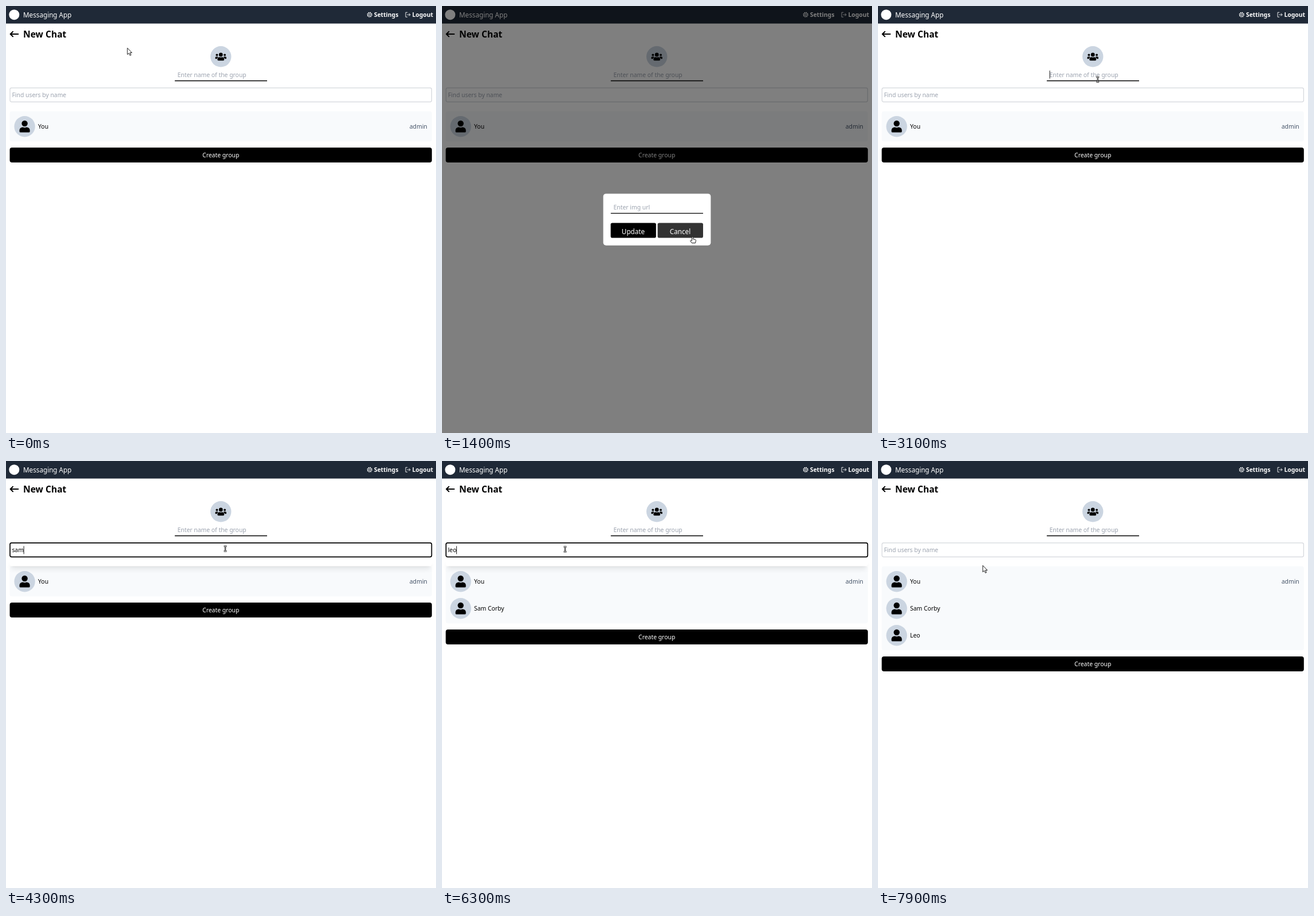
An HTML page for the animation above (8000 ms loop, 751 by 745 pixels).

```html
<!DOCTYPE html>
<html lang="en">
<head>
<meta charset="utf-8">
<title>New group chat</title>
<style>
  html, body { margin: 0; width: 100%; height: 100%; overflow: hidden; background: #fff; }
  svg { display: block; width: 751px; height: 745px; font-family: "Noto Sans", sans-serif; }
  text { white-space: pre; }
</style>
</head>
<body>
<svg id="stage" viewBox="0 0 751 745" xmlns="http://www.w3.org/2000/svg"></svg>
<script>
const LOOP = 8000, STEP = 100, ROW = 47;
const BODY = 10.4, LARGE = 11.7, TITLE = 15.6;
const MUTED = '#9ca3af', SLATE = '#475569', DISC = '#cbd5e1';
const stage = document.getElementById('stage');

// Text placed by the middle of its line box.
const label = (x, middle, text, { size = BODY, fill = '#000', weight = 400, anchor = 'start', id = '' } = {}) =>
  `<text ${id && `id="${id}"`} x="${x}" y="${middle + size * 0.388}" font-size="${size}" fill="${fill}"
    font-weight="${weight}" text-anchor="${anchor}">${text}</text>`;

const box = (x, y, w, h, r, fill, extra = '') =>
  `<rect x="${x}" y="${y}" width="${w}" height="${h}" rx="${r}" fill="${fill}" ${extra}/>`;

const avatar = (x, y) => `<g transform="translate(${x} ${y})">
  <circle r="18.2" fill="${DISC}"/><use href="#person" transform="scale(.0406) translate(-224 -256)"/></g>`;

const member = (name, i) => `<g id="row${i}">${avatar(32.6, 210.2 + ROW * i)}
  ${label(56, 210.2 + ROW * i, name)}</g>`;

const caret = (id, y) => `<path id="${id}" d="M0 ${y}v14" stroke="#000" stroke-width=".9"/>`;

const people = ['You', 'Sam Corby', 'Leo'];

stage.innerHTML = `
<defs>
  <g id="person">
    <circle cx="224" cy="128" r="128"/>
    <path d="M314 288h-17q-73 32-146 0h-17A134 134 0 0 0 0 422v42a48 48 0 0 0 48 48h352a48 48 0 0 0 48-48v-42A134 134 0 0 0 314 288z"/>
  </g>
  <g id="side">
    <circle cx="96" cy="160" r="64"/>
    <path d="M173 275A64 64 0 0 0 128 256H64A64 64 0 0 0 0 320v32a32 32 0 0 0 32 32h66q10-72 75-109z"/>
  </g>
  <filter id="soft" x="-5%" y="-100%" width="110%" height="300%"><feGaussianBlur stdDeviation="4.9"/></filter>
  <filter id="tight" x="-5%" y="-100%" width="110%" height="300%"><feGaussianBlur stdDeviation="1.9"/></filter>
</defs>

<rect width="751" height="745" fill="#fff"/>
<rect width="751" height="30.6" fill="#1f2937"/>
<circle cx="14.3" cy="15.2" r="9" fill="#fff"/>
${label(30, 15.2, 'Messaging App', { size: LARGE, fill: '#fff' })}
<g fill="none" stroke="#fff" transform="translate(635.1 15.2)">
  <circle r="4" stroke-width="1.3" stroke-dasharray="1.7 1.44"/>
  <circle r="3.2" stroke-width=".8"/><circle r="1.4" stroke-width=".8"/>
</g>
${label(642.7, 15.2, 'Settings', { fill: '#fff', weight: 700 })}
<path d="M701.2 11.2H698v8h3.2M700.4 15.2h5.6m-2.3-2.4 2.4 2.4-2.4 2.4" fill="none" stroke="#fff" stroke-width=".9"/>
${label(709.4, 15.2, 'Logout', { fill: '#fff', weight: 700 })}

<path d="M21.3 49H7.6m4.4-4.3L7.6 49l4.4 4.3" fill="none" stroke="#000" stroke-width="2" stroke-linecap="round" stroke-linejoin="round"/>
${label(30, 49.2, 'New Chat', { size: TITLE, weight: 700 })}

<circle cx="375.2" cy="88.3" r="18.2" fill="${DISC}"/>
<g transform="translate(375.2 88.3) scale(.0305) translate(-320 -256)">
  <use href="#side"/><use href="#side" transform="translate(640) scale(-1 1)"/>
  <circle cx="320" cy="144" r="112"/>
  <path d="M397 288h-9q-68 32-136 0h-9A115 115 0 0 0 128 403v29a48 48 0 0 0 48 48h288a48 48 0 0 0 48-48v-29A115 115 0 0 0 397 288z"/>
</g>
${label(299.5, 120, 'Enter name of the group', { fill: MUTED })}
${caret('groupCaret', 112.7)}
<path d="M294.8 130.5H456" stroke="#000" stroke-width="1.3"/>

${box(7, 142.8, 736.4, 24.6, 2.8, '#fff', 'id="search" stroke="#d4d7dc"')}
${label(10.4, 155.1, 'Find users by name', { fill: MUTED, id: 'hint' })}
${label(10.4, 155.1, '', { id: 'query' })}
${caret('searchCaret', 148.4)}

${box(6.5, 183.7, 737.3, 52.6, 4, '#f8fafc', 'id="list"')}
${people.map(member).join('')}
${label(735.8, 210.2, 'admin', { fill: SLATE, anchor: 'end' })}
<g id="create">
  ${box(6.5, 247, 737.3, 26, 4, '#000')}
  ${label(375.2, 260, 'Create group', { fill: '#fff', anchor: 'middle' })}
</g>

<g id="drop">
  ${box(8.5, 181.6, 733.3, 6.5, 3, '#000', 'id="shadowSoft" opacity=".1" filter="url(#soft)"')}
  ${box(9.1, 178.4, 732.1, 5.2, 3, '#000', 'id="shadowTight" opacity=".1" filter="url(#tight)"')}
  ${box(6.5, 173.2, 737.3, 10.4, 4, '#fff', 'id="panel"')}
  <g id="result">
    ${box(11.7, 178.9, 726.9, 52, 4, '#fff', 'id="item"')}
    ${avatar(36.5, 204.8)}
    ${label(62.8, 202.4, '', { weight: 700, id: 'found' })}
    ${label(732, 202.4, '31/12/2024', { fill: '#4b5563', anchor: 'end' })}
  </g>
</g>

<g id="modal">
  <rect width="751" height="745" opacity=".5"/>
  ${box(281.6, 327.4, 187.8, 90.4, 5, '#fff')}
  ${label(299.5, 351.2, 'Enter img url', { fill: MUTED })}
  <path d="M294.8 361.6H456" stroke="#000" stroke-width="1.3"/>
  ${box(294.6, 378.4, 79.2, 26.2, 2.8, '#000', 'id="update"')}
  ${box(376.6, 378.4, 79.4, 26.2, 2.8, '#000', 'id="cancel"')}
  ${label(334, 393, 'Update', { size: LARGE, fill: '#fff', anchor: 'middle' })}
  ${label(416, 393, 'Cancel', { size: LARGE, fill: '#fff', anchor: 'middle' })}
</g>

<g id="pointer" stroke-linejoin="round">
  <path id="arrow" d="M0 .3V11.6L2.7 9.3 4.5 13.3 6.4 12.5 4.6 8.6H8Z" fill="#fff" stroke="#000" stroke-width=".9"/>
  <path id="hand" d="M-1.1 1.2Q0-.6 1.1 1.2V4.3L5 5Q6.1 5.4 5.9 7L5 11H-1.2L-3.9 7.2Q-3.5 5.6-1.1 6.9Z" fill="#fff" stroke="#000" stroke-width=".9"/>
  <g id="beam" fill="none">
    <path d="M-2.5-4.4H2.5M-2.5 4.4H2.5M0-4.4V4.4" stroke="#000" stroke-width="2.4"/>
    <path d="M-2.7-4.4H2.7M-2.7 4.4H2.7M0-4.4V4.4" stroke="#fff" stroke-width=".8"/>
  </g>
</g>`;

const el = {};
stage.querySelectorAll('[id]').forEach(node => el[node.id] = node);
const show = (name, on) => el[name].setAttribute('visibility', on ? 'inherit' : 'hidden');
const set = (name, attrs) => Object.entries(attrs).forEach(([key, value]) => el[name].setAttribute(key, value));

// Pointer way-points: time, x, y.
const path = [
  [0, 212, 73], [300, 268, 82], [600, 350, 88], [700, 363, 83], [900, 363, 83],
  [1100, 425, 200], [1200, 470, 310], [1300, 477, 372], [1400, 437.5, 402.5], [1500, 437.5, 402.5],
  [1600, 434, 353], [1800, 405, 210], [2000, 386, 125], [2100, 384, 120], [3000, 384, 120],
  [3400, 383, 153], [4500, 383, 153], [4800, 250, 192], [5000, 229, 192], [5200, 226, 175],
  [5300, 222, 161], [5500, 215, 154], [6700, 215, 154], [7000, 194.5, 181.3], [7300, 184, 190],
  [7700, 184, 190], [7800, 183.3, 184], [7900, 183, 182], [8000, 183, 182]
];

// Each search: focus, key presses, arrival of the result, choice.
const searches = [
  { focus: 3600, keys: [3900, 4100, 4300], result: 4500, pick: 5000, query: 'sam', name: 'Sam Corby', blink: [4900, 5000] },
  { focus: 5400, keys: [5900, 6100, 6300], result: 6600, pick: 7700, query: 'leo', name: 'Leo', blink: [6900, 7500] }
];

const within = (t, from, to) => t >= from && t < to;

function pointerAt(t) {
  const i = path.findIndex((point, k) => k && t <= point[0]);
  const [t0, x0, y0] = path[i - 1], [t1, x1, y1] = path[i];
  const k = (t - t0) / (t1 - t0);
  return { x: x0 + (x1 - x0) * k, y: y0 + (y1 - y0) * k };
}

function render(t) {
  const { x, y } = pointerAt(t);
  const over = (left, top, right, bottom) => within(x, left, right) && within(y, top, bottom);
  const modal = within(t, 800, 1600);
  const search = searches.find(s => within(t, s.focus, s.pick));
  const typed = search ? search.keys.filter(time => t >= time).length : 0;
  const hasResult = Boolean(search && t >= search.result);
  const extra = searches.filter(s => t >= s.pick).length;

  show('modal', modal);
  const onUpdate = modal && over(294, 378, 374, 405);
  const onCancel = modal && over(376, 378, 456, 405);
  set('update', { fill: onUpdate ? '#333' : '#000' });
  set('cancel', { fill: onCancel ? '#333' : '#000' });

  show('groupCaret', within(t, 2100, 2500) || within(t, 3100, 3600));
  set('groupCaret', { transform: 'translate(300)' });

  set('search', { stroke: search ? '#000' : '#d4d7dc', 'stroke-width': search ? 1.7 : 1.2 });
  show('hint', !typed);
  el.query.textContent = search ? search.query.slice(0, typed) : '';
  show('searchCaret', search && !within(t, ...search.blink));
  set('searchCaret', { transform: `translate(${10.6 + (typed ? el.query.getComputedTextLength() : 0)})` });

  people.forEach((_, i) => show('row' + i, i <= extra));
  set('list', { height: 52.6 + ROW * extra });
  set('create', { transform: `translate(0 ${ROW * extra})` });

  const grow = hasResult ? 52.6 : 0;
  const onItem = hasResult && over(12, 179, 738, 231);
  show('drop', typed > 0);
  show('result', hasResult);
  set('panel', { height: 10.4 + grow });
  set('shadowSoft', { height: 6.5 + grow });
  set('shadowTight', { height: 5.2 + grow });
  set('item', { fill: onItem ? '#e5e7eb' : '#fff' });
  el.found.textContent = search ? search.name : '';

  const onAvatar = !modal && Math.hypot(x - 375.2, y - 88.3) < 18.2;
  const onField = !modal && (over(295, 109, 456, 131) || over(6, 142, 744, 168));
  const hand = onAvatar || onUpdate || onCancel || onItem;
  set('pointer', { transform: `translate(${x} ${y})` });
  show('hand', hand);
  show('beam', !hand && onField);
  show('arrow', !hand && !onField);
}

const start = performance.now();
function tick() {
  const t = (performance.now() - start) % LOOP;
  render(Math.floor(t / STEP) * STEP);
  requestAnimationFrame(tick);
}
tick();
</script>
</body>
</html>
```
